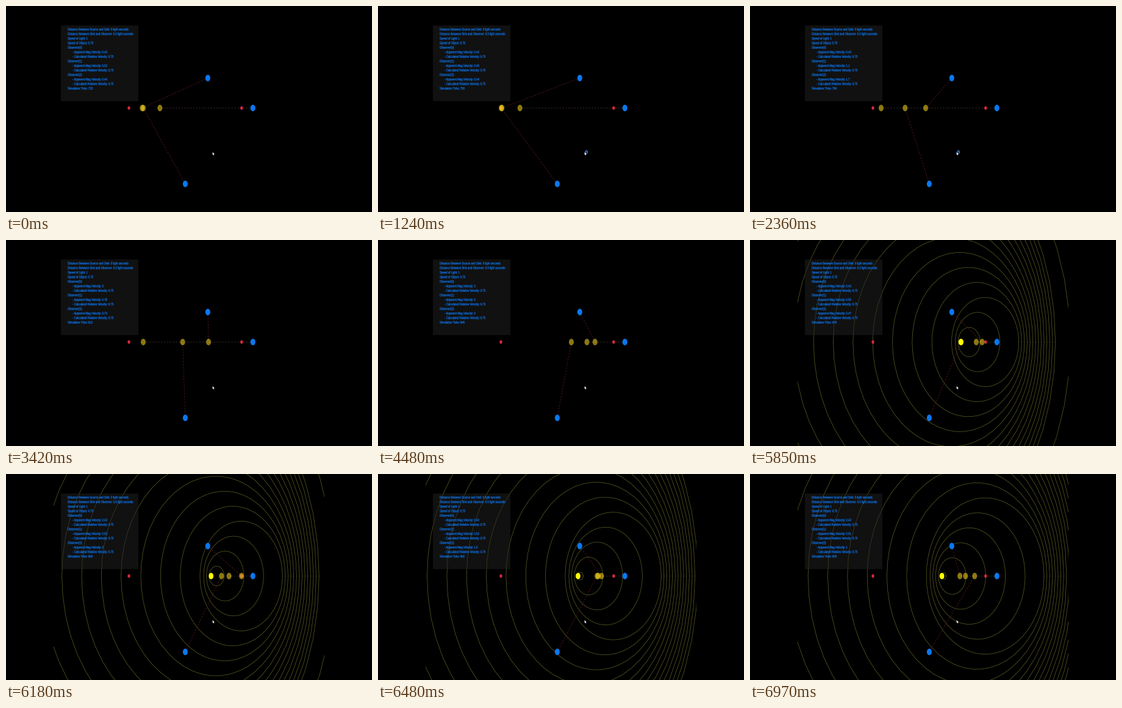
These frames come from a looping animation (600x338 px, 7 s). A matplotlib script:

```python
from math import hypot

import numpy as np
import matplotlib.pyplot as plt
from matplotlib.animation import FuncAnimation
from matplotlib.patches import Ellipse, PathPatch, Polygon, Rectangle
from matplotlib.textpath import TextPath
from matplotlib.transforms import Affine2D

W, H, DPI = 600, 338, 100
FRAMES, STEP = 350, 20
PX = 72 / DPI

# World: light seconds, squeezed horizontally to 3/4
SX, SY = 36.95, 49.2
X0, Y0 = 201.5, 167.4
SPAN, SPEED = 5.0, 0.75
TURN = 4.375             # when the object leaves the sink
PULSE, PHASE = 0.5, 0.35  # wavefront spacing and offset in seconds
WAVES_ON = 5.3
BUSY = (1.15, 3.1)
OBSERVERS = [(5.5, 0.0), (2.5, 2.53), (3.5, -1.0)]

BLUE, RED, YELLOW = "#0a78f0", "#d8283c", "#ffff00"


def to_px(x, y):
    return X0 + SX * x, Y0 + SY * y


def source(t):
    """Position and heading of the object shuttling between the ends."""
    trip = SPAN / SPEED
    phase = (t - TURN) % (2 * trip)
    if phase < trip:
        return SPAN - SPEED * phase, -1
    return SPEED * (phase - trip), 1


def apparent(t, obs):
    """Where the observer sees the object now, and how fast it seems to go."""
    lo, hi = t - 10, t
    for _ in range(24):
        mid = (lo + hi) / 2
        if mid + hypot(source(mid)[0] - obs[0], obs[1]) < t:
            lo = mid
        else:
            hi = mid
    x, heading = source(lo)
    cos = heading * (x - obs[0]) / hypot(x - obs[0], obs[1])
    return x, SPEED / (1 + SPEED * cos)


def wavefronts(t):
    a = np.linspace(0, 2 * np.pi, 51)
    xs, ys = [], []
    for k in range(24):
        age = (t - PHASE) % PULSE + k * PULSE
        cx, cy = to_px(source(t - age)[0], 0)
        xs += [*(cx + SX * age * np.cos(a)), np.nan]
        ys += [*(cy + SY * age * np.sin(a)), np.nan]
    return xs, ys


def report(t, speeds):
    lines = ["Distance Between Source and Sink: 5 light seconds",
             "Distance Between Sink and Observer: 0.5 light seconds",
             "Speed of Light: 1",
             "Speed of Object: 0.75"]
    for i, v in enumerate(speeds):
        lines += [f"Observer({i}):",
                  f"- Apparent Mag Velocity: {v:.2g}",
                  "- Calculated Relative Velocity: 0.75"]
    return lines + [f"Simulation Ticks: {723 + int(26.2 * t)}"]


fig = plt.figure(figsize=(W / DPI, H / DPI), dpi=DPI, facecolor="black")
ax = fig.add_axes([0, 0, 1, 1])
ax.set(xlim=(0, W), ylim=(H, 0))
ax.axis("off")


def dot(x, y, r, color, z, alpha=1):
    return ax.add_patch(Ellipse(to_px(x, y), 2 * r, 2 * r * SY / SX, fc=color,
                                ec="none", alpha=alpha, zorder=z))


rings, = ax.plot([], [], color="#5c5c26", lw=0.75 * PX, zorder=1)
view = Rectangle((78, 0), 444, H, transform=ax.transData)
rings.set_clip_path(view)

ax.add_patch(Rectangle((90, 32), 127, 124, fc="#222222", ec="none",
                       alpha=0.52, zorder=2))

rays = [ax.plot([], [], color=c, lw=0.8 * PX, dashes=(3.4, 2.6), zorder=3)[0]
        for c in ("#402c2e", "#5c1a20", "#5c1a20")]
for end in (0, SPAN):
    dot(end, 0, 2.2, RED, 4)
for obs in OBSERVERS:
    dot(*obs, 4, BLUE, 5)
ghosts = [dot(0, 0, 4, "#ffdc20", 6, 0.55) for _ in OBSERVERS]
ball = dot(0, 0, 3.9, YELLOW, 7)

glyphs = {}


def text_path(s):
    if s not in glyphs:
        glyphs[s] = TextPath((0, 0), s, size=5.8,
                             prop={"family": "Liberation Sans"})
    return glyphs[s]


rows = []
for i, line in enumerate(report(0, [0, 0, 0])):
    x = 109 if line.startswith("-") else 101
    place = Affine2D().scale(SX / SY, -1).translate(x, 40.2 + 7.45 * i)
    rows.append(ax.add_patch(PathPatch(
        text_path(line), fc="#0a7cff", ec="#0a7cff", lw=0.15 * PX,
        transform=place + ax.transData, zorder=8)))

ax.add_patch(Polygon([(338.7, 239.8), (338.7, 244.5), (339.8, 243.6),
                      (340.6, 245.2), (341.3, 244.8), (340.6, 243.3),
                      (341.7, 243)], fc="white", ec="none", zorder=9))
busy = ax.add_patch(Ellipse((341.6, 239.7), 3.4, 4.2, fc="none", ec="#4a9cf0",
                            lw=1.2 * PX, zorder=9))


def draw(i):
    t = i * STEP / 1000
    speeds = []
    for obs, ghost, ray in zip(OBSERVERS, ghosts, rays):
        x, v = apparent(t, obs)
        gx, gy = to_px(x, 0)
        ox, oy = to_px(*obs)
        ghost.set_center((gx, gy))
        ray.set_data([ox, gx], [oy, gy])
        speeds.append(v)
    # side readings drop out briefly as the object turns
    if TURN <= t < TURN + 0.3:
        speeds[1:] = [0, 0]
    for row, line in zip(rows, report(t, speeds)):
        row.set_path(text_path(line))

    shown = t >= WAVES_ON
    rings.set_visible(shown)
    ball.set_visible(shown)
    if shown:
        rings.set_data(*wavefronts(t))
        ball.set_center(to_px(source(t)[0], 0))
    busy.set_visible(BUSY[0] <= t < BUSY[1])
    return [rings, ball, busy, *ghosts, *rays, *rows]


anim = FuncAnimation(fig, draw, frames=FRAMES, init_func=lambda: draw(0),
                     interval=STEP, repeat=True, repeat_delay=0)
plt.show()
```
